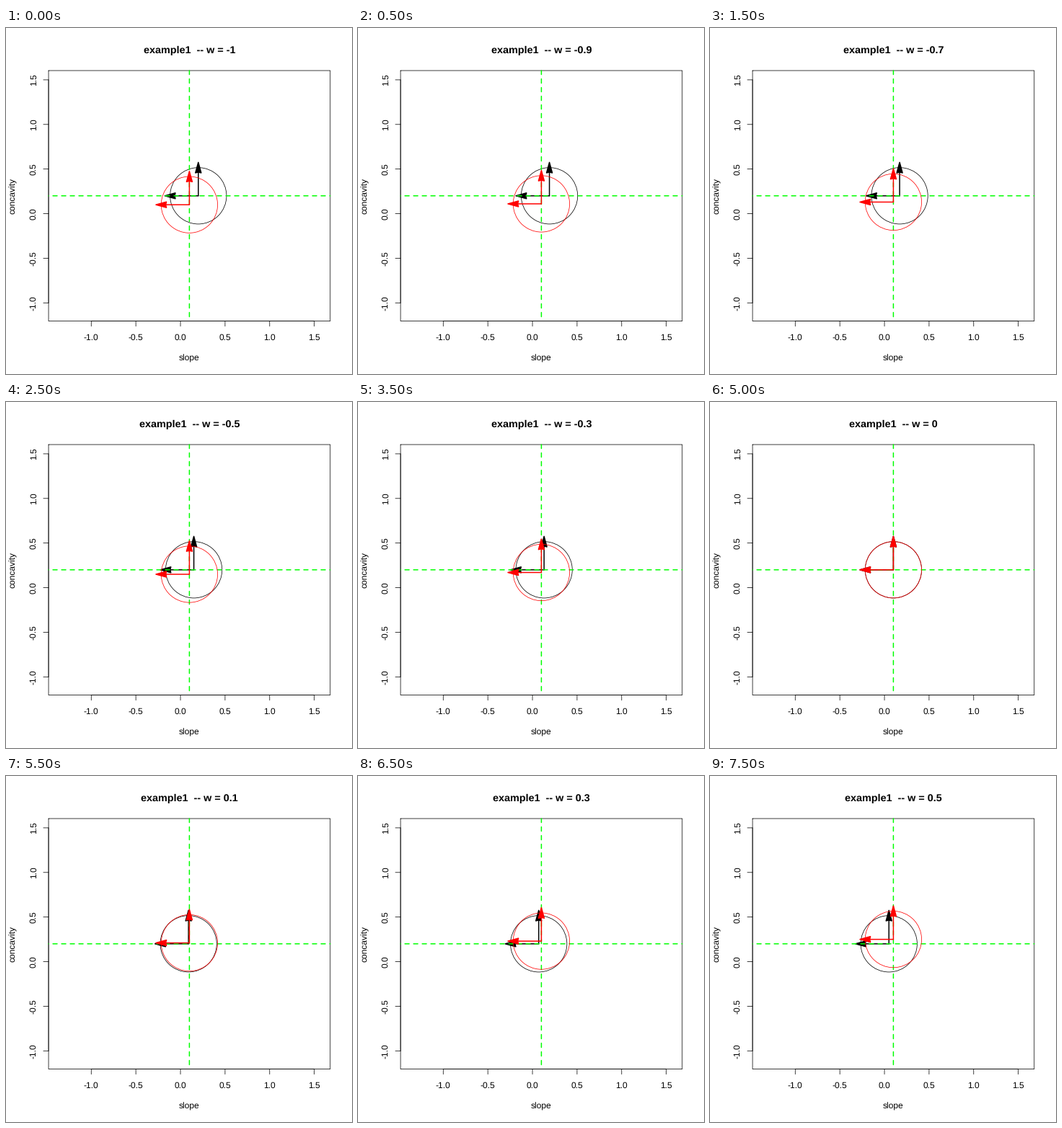
Animation, 480 px wide and 480 px high, one loop 8000 ms. Source, as a matplotlib script:

```python
import numpy as np
import matplotlib as mpl
import matplotlib.pyplot as plt
from matplotlib.animation import FuncAnimation
from matplotlib.patches import Circle, Polygon

mpl.rcParams["font.family"] = "Liberation Sans"
mpl.rcParams["text.hinting"] = "none"
mpl.rcParams["toolbar"] = "None"

SIZE, DPI = 480, 72            # at 72 dpi one point is one pixel
FRAMES, INTERVAL = 16, 500
LEFT, RIGHT, TOP, BOTTOM = 59.04, 449.76, 59.04, 406.56
SCALE = (BOTTOM - TOP) / 2.808
CX, CY = 0.1, 0.2              # fixed point marked by the dashed lines
RADIUS = np.sqrt(0.1) * SCALE
THIN, THICK = 0.75, 1.5
TICK = 7.2
DASH = 6

# Arrowhead along +x, centred on the origin, with a slight notch at the back
HEAD = np.array([(7.3, 0), (-7.3, 4), (-6.3, 0), (-7.3, -4)])


def px(x):
    return (LEFT + RIGHT) / 2 + (x - CX) * SCALE


def py(y):
    return (TOP + BOTTOM) / 2 - (y - CY) * SCALE


fig = plt.figure(figsize=(SIZE / DPI, SIZE / DPI), dpi=DPI, facecolor="white")
ax = fig.add_axes([0, 0, 1, 1])
ax.set_xlim(0, SIZE)
ax.set_ylim(SIZE, 0)
ax.axis("off")


def line(xs, ys, color="black", lw=THIN, **kw):
    return ax.plot(xs, ys, color=color, lw=lw, snap=False, zorder=2,
                   solid_capstyle="round", **kw)[0]


def label(x, y, s, size=12, **kw):
    return ax.text(x, y, s, fontsize=size, ha="center", va="baseline",
                   rotation_mode="anchor", **kw)


def draw_frame():
    line([LEFT, RIGHT, RIGHT, LEFT, LEFT], [TOP, TOP, BOTTOM, BOTTOM, TOP])
    line([px(-1), px(1.5)], [BOTTOM, BOTTOM])
    line([LEFT, LEFT], [py(-1), py(1.5)])
    for v in np.arange(-1, 1.6, 0.5):
        x, y = px(v), py(v)
        line([x, x], [BOTTOM, BOTTOM + TICK])
        line([LEFT - TICK, LEFT], [y, y])
        label(x, 432.4, f"{v:.1f}")
        label(41.8, y, f"{v:.1f}", rotation=90)
    label(px(CX), 461.3, "slope")
    label(13, py(CY), "concavity", rotation=90)


def draw_guides():
    dash = DASH / THICK
    style = dict(color="#00ff00", lw=THICK, dash_capstyle="round",
                 linestyle=(dash, (dash, dash)))
    line([LEFT, RIGHT], [py(CY)] * 2, **style)
    line([px(CX)] * 2, [BOTTOM, TOP], **style)


class Arrow:
    def __init__(self, color, direction):
        self.d = np.array(direction, float)
        self.shaft = line([], [], color, THICK)
        self.head = ax.add_patch(Polygon(HEAD, closed=True, fc=color, ec=color,
                                         lw=THICK, joinstyle="round",
                                         snap=False, zorder=2))

    def move(self, start):
        end = start + self.d * RADIUS
        self.shaft.set_data([start[0], end[0]], [start[1], end[1]])
        side = np.array([-self.d[1], self.d[0]])
        self.head.set_xy(end + HEAD[:, :1] * self.d + HEAD[:, 1:] * side)


class Marker:
    """Circle with one arrow pointing up and one pointing left."""

    def __init__(self, color):
        self.circle = ax.add_patch(Circle((0, 0), RADIUS, fill=False,
                                          ec=color, lw=THIN, zorder=2))
        self.arrows = [Arrow(color, (0, -1)), Arrow(color, (-1, 0))]

    def move(self, x, y):
        pos = np.array([px(x), py(y)])
        self.circle.center = pos
        for arrow in self.arrows:
            arrow.move(pos)


# Artists share one zorder, so they stack in the order they are added;
# patches and lines are sorted together.
draw_frame()
black = Marker("black")
draw_guides()
red = Marker("red")
title = label(px(CX), 35, "", 14.4, weight="bold")


def update(i):
    w = (i - 10) / 10
    black.move(CX - 0.1 * w, CY)
    red.move(CX, CY + 0.1 * w)
    title.set_text(f"example1  -- w = {w:g}")
    return []


anim = FuncAnimation(fig, update, frames=FRAMES, interval=INTERVAL,
                     init_func=lambda: update(0), repeat=True,
                     repeat_delay=0, blit=False)
plt.show()
```
